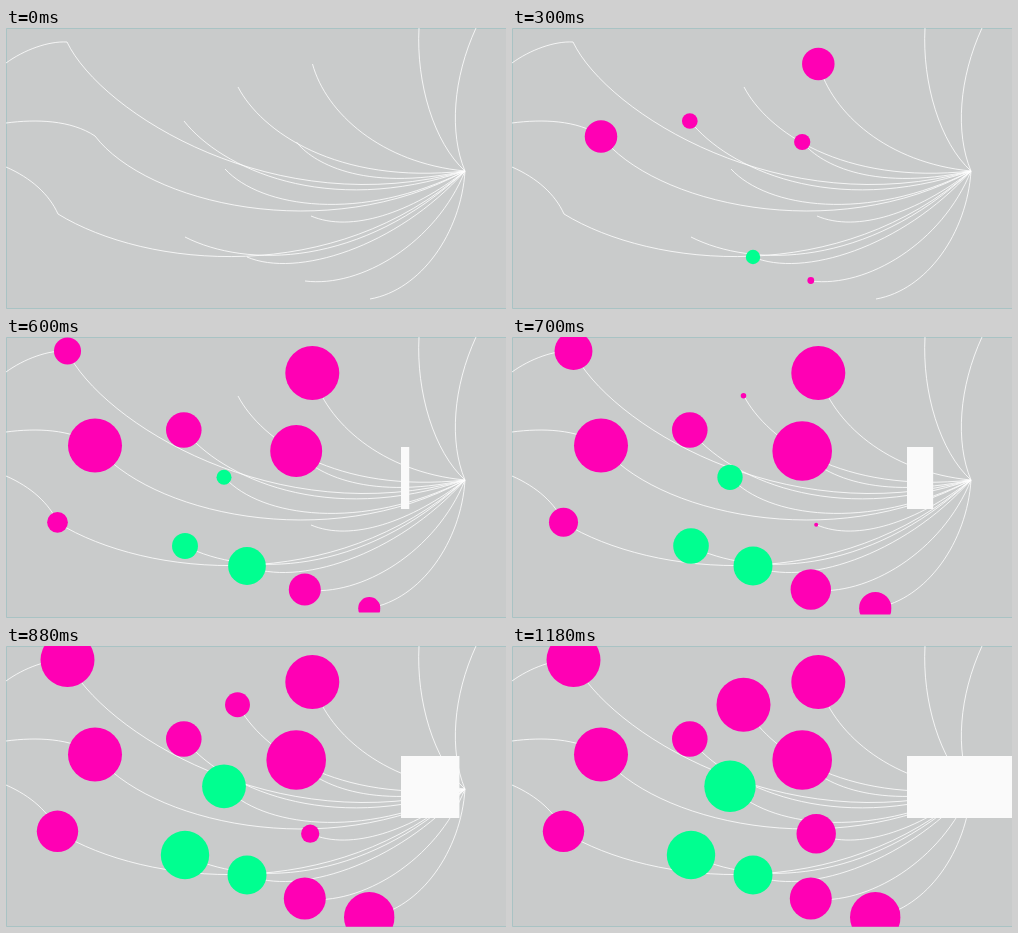
Recreate the animation shown at these times as an HTML page. Size 500 by 281 pixels, loop 1.7 s.

```html
<!DOCTYPE html>
<html lang="en">
<head>
<meta charset="utf-8">
<title>Growing nodes</title>
<style>
  html, body { margin: 0; width: 100%; height: 100%; overflow: hidden; background: #c9cbcb; }
  svg { display: block; width: 100vw; height: 100vh; }
  .lines { fill: none; stroke: #fff; stroke-width: .8; }
  .edge { fill: none; stroke: #a9c3c4; }
</style>
</head>
<body>
<svg viewBox="0 0 500 281" preserveAspectRatio="none">
  <defs>
    <clipPath id="cut" clipPathUnits="objectBoundingBox"><rect width="1" height=".688"/></clipPath>
  </defs>
  <path class="edge" d="M500 .5H.5V280.5H500"/>
  <g class="lines">
    <path d="M413 0C410 55 428 115 459 143"/>
    <path d="M470 0C447 50 443 105 459 143"/>
    <path d="M306.5 36C320 85 375 135 459 143"/>
    <path d="M232 59C255 103 330 157 459 143"/>
    <path d="M290.5 114C305 133 355 165 459 143"/>
    <path d="M178 93C215 140 320 190 459 143"/>
    <path d="M0 35C18 22 42 13 61 14C95 85 270 195 459 143"/>
    <path d="M0 95C30 91 65 92 89 108C140 175 320 219 459 143"/>
    <path d="M0 139C25 150 43 166 52 186C140 240 328 259 459 143"/>
    <path d="M241 229C290 250 390 220 459 143"/>
    <path d="M179 209C240 240 355 240 459 143"/>
    <path d="M299 253C355 260 430 215 459 143"/>
    <path d="M364 271C415 262 455 205 459 143"/>
    <path d="M219 141C255 180 355 195 459 143"/>
    <path d="M305 188C345 205 405 185 459 143"/>
  </g>
  <g id="stage"></g>
</svg>
<script>
const LOOP = 1700, GROW = 500;
const PINK = '#ff00b4', GREEN = '#00ff90';
const stage = document.getElementById('stage');

function add(tag, attrs) {
  const el = document.createElementNS('http://www.w3.org/2000/svg', tag);
  for (const key in attrs) el.setAttribute(key, attrs[key]);
  return stage.appendChild(el);
}

// Grows one size property linearly from 0, then holds until the loop restarts.
function grow(el, prop, size, start, span) {
  el.animate([
    { [prop]: '0px', offset: 0 },
    { [prop]: '0px', offset: start / LOOP },
    { [prop]: `${size}px`, offset: (start + span) / LOOP },
    { [prop]: `${size}px`, offset: 1 }
  ], { duration: LOOP, iterations: Infinity });
}

function dot(cx, cy, r, start, fill = PINK, extra = {}) {
  grow(add('circle', { cx, cy, fill, ...extra }), 'r', r, start, GROW);
}

dot(306.3, 36, 27, 0);
dot(89, 108.5, 27, 0);
dot(177.8, 93, 17.8, 80);
dot(241, 229, 19.5, 117, GREEN);
dot(290.2, 114, 29.8, 165);
dot(298.8, 252.5, 21, 220);
dot(179, 209, 24.2, 333, GREEN);
dot(61.5, 14, 27, 350);
dot(51.5, 185.3, 20.7, 350);
dot(363.3, 271.3, 25.3, 380, PINK, { 'clip-path': 'url(#cut)' });
dot(218, 140.3, 25.7, 455, GREEN);
dot(231.5, 58.7, 27, 650);
dot(304.2, 187.7, 19.7, 650);

const bar = add('rect', { x: 395, y: 110, height: 62, fill: '#fafafa' });
grow(bar, 'width', 112, 555, 625);
</script>
</body>
</html>
```
